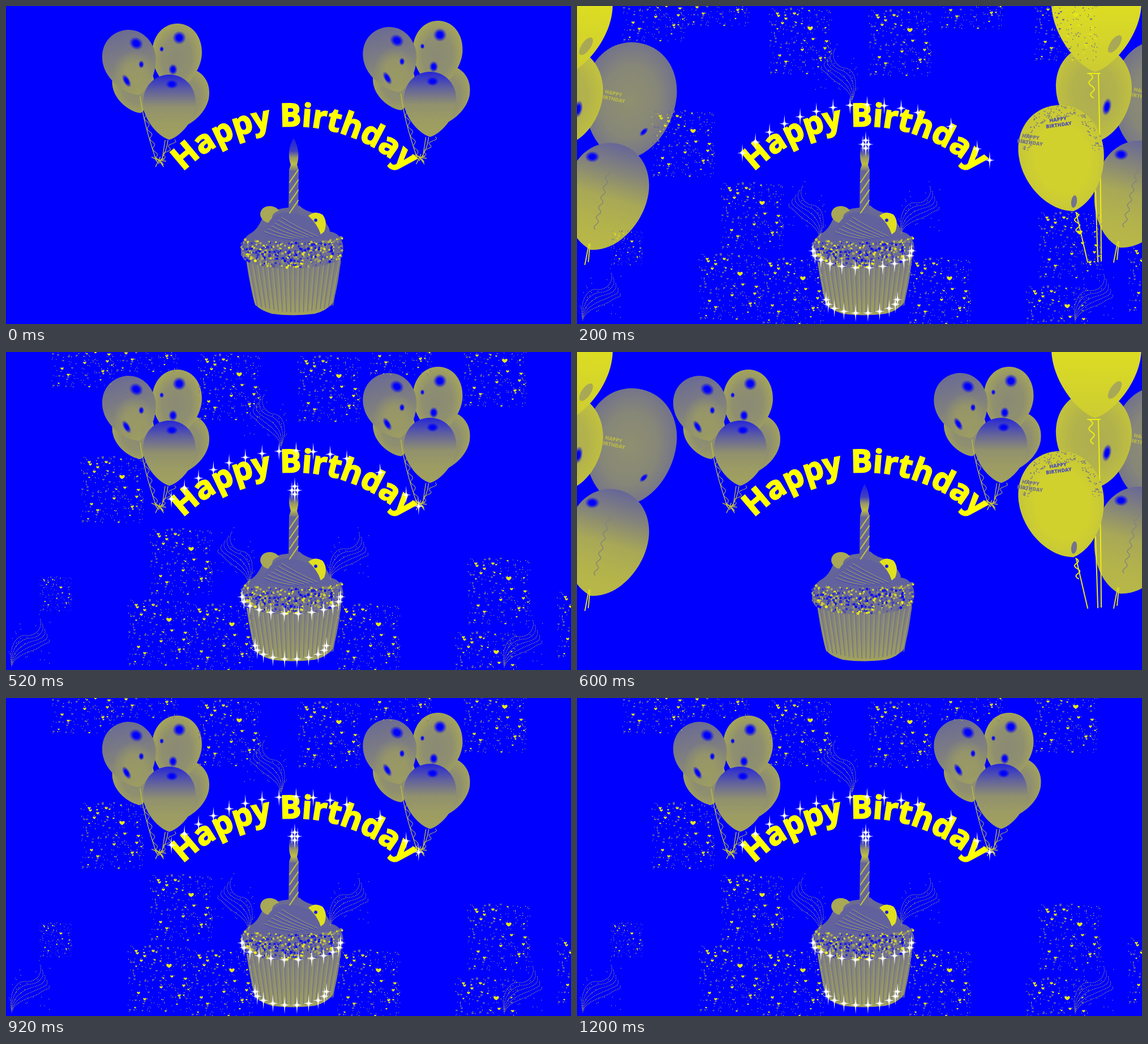
Recreate the animation shown at these times as an HTML page. Size 998 by 561 pixels, loop 1.4 s.

```html
<!DOCTYPE html>
<html lang="en">
<head>
<meta charset="utf-8">
<title>Happy Birthday</title>
<style>
html, body { margin: 0; width: 100%; height: 100%; overflow: hidden; background: #00f; }
svg { display: block; width: 100%; height: 100%; }
.title { font: 700 56px "Open Sans", "Noto Sans", sans-serif; fill: #ff0; stroke: #ff0; stroke-width: 2.2; }
.print { font: 800 9px "Open Sans", sans-serif; text-anchor: middle; }
.line { fill: none; stroke-linecap: round; stroke-linejoin: round; }
</style>
</head>
<body>
<svg viewBox="0 0 998 561" preserveAspectRatio="none">
  <defs id="defs">
    <path id="arc" d="M266.5 352A280 280 0 0 1 751.5 352"/>
    <path id="star" d="M0-16L1.1-1.1 9 0 1.1 1.1 0 16-1.1 1.1-9 0-1.1-1.1Z"/>
  </defs>
  <rect width="998" height="561" fill="#00f"/>
  <g id="small"></g>
  <g id="cake"></g>
  <g id="big"></g>
  <text class="title" text-anchor="middle"><textPath href="#arc" startOffset="50%">Happy Birthday</textPath></text>
  <g id="party"></g>
</svg>
<script>
const $ = id => document.getElementById(id);
const add = (id, markup) => $(id).insertAdjacentHTML('beforeend', markup);
const range = n => Array.from({ length: n }, (_, i) => i);
const fix = v => v.toFixed(1);

// Two-colour scale: 0 is blue, 1 is yellow.
const tone = t => {
  const v = Math.round(255 * t);
  return `rgb(${v},${v},${255 - v})`;
};

const random = seed => () => {
  seed = (seed * 1664525 + 1013904223) >>> 0;
  return seed / 4294967296;
};

// Gradients take evenly spaced tones.
const stops = tones => tones.map((t, i) =>
  `<stop offset="${i / (tones.length - 1)}" stop-color="${tone(t)}"/>`).join('');
const radial = (id, ...tones) => add('defs', `<radialGradient id="${id}" r=".6">${stops(tones)}</radialGradient>`);
const linear = (id, ...tones) => add('defs', `<linearGradient id="${id}" x2="0" y2="1">${stops(tones)}</linearGradient>`);
const fade = (id, t) => add('defs', `<radialGradient id="${id}"><stop offset=".4" stop-color="${tone(t)}"/>
  <stop offset="1" stop-color="${tone(t)}" stop-opacity="0"/></radialGradient>`);

const path = (d, color, w) => w
  ? `<path class="line" d="${d}" stroke="${color}" stroke-width="${w}"/>`
  : `<path d="${d}" fill="${color}"/>`;
const oval = (x, y, rx, ry, fill, turn = 0) =>
  `<ellipse rx="${rx}" ry="${ry}" fill="${fill}" transform="translate(${x} ${y}) rotate(${turn})"/>`;
const spot = (x, y, rx, ry, turn) => oval(x, y, rx, ry, 'url(#spot)', turn);

// "full" sets how round the lower half is.
const balloon = (x, y, rx, ry, turn, fill, full = .4) =>
  `<path transform="translate(${x} ${y}) rotate(${turn}) scale(${rx} ${ry})"
   d="M-1 0C-1-.58-.57-1 0-1S1-.58 1 0C1 .6 ${full} 1.2 0 1.3C${-full} 1.2-1 .6-1 0Z" fill="url(#${fill})"/>`;

// Wavy ribbon between two points.
const ribbon = (x1, y1, x2, y2, wave, turns) => 'M' + range(41).map(i => {
  const u = i / 40;
  return fix(x1 + (x2 - x1) * u + Math.sin(u * turns * 2 * Math.PI) * wave) + ' ' + fix(y1 + (y2 - y1) * u);
}).join('L');

function smallBunch() {
  fade('spot', 0);
  fade('glow', .62);
  linear('left', .42, .5, .62);
  radial('top', .54, .56, .68);
  radial('back', .54, .56, .66);
  linear('front', .15, .38, .57, .61, .63);
  const r = random(8);
  const tails = range(12).map(() => `M270 272l${fix(r() * 28 - 14)} ${fix(r() * 18 - 6)}`).join('');
  add('defs', '<g id="bunch">' +
    path(ribbon(244, 186, 268, 275, 3, 5) + ribbon(298, 236, 270, 278, 4, 3), tone(.58), 1.2) +
    balloon(225, 137, 37, 41, -14, 'back') +
    balloon(318, 155, 41, 45, 8, 'back') +
    balloon(302, 83, 44, 52, 3, 'top') +
    spot(306, 56, 12, 12) + spot(295, 112, 8, 10) + spot(275, 76, 4, 5) +
    balloon(217.5, 93, 47, 51, -16, 'left') +
    `<g opacity=".7">${oval(226, 117, 38, 40, 'url(#glow)')}</g>` +
    spot(230, 66, 13, 11, 30) + spot(213, 132, 6, 13, -30) + spot(239, 103, 5, 7) +
    balloon(288.5, 171, 46.5, 50, 0, 'front') +
    spot(293, 138, 11, 8) +
    path('M237 160Q243 208 266 274M286 237Q284 258 270 277M281 237L276 270', tone(.75), 1.3) +
    path(tails, tone(.75), 1.4) + '</g>');
  add('small', '<use href="#bunch"/><use href="#bunch" x="460.5" y="-5"/>');
}

const print = (x, y, turn, t) =>
  `<g class="print" transform="translate(${x} ${y}) rotate(${turn})" fill="${tone(t)}">
   <text>HAPPY</text><text y="10">BIRTHDAY</text></g>`;

function bigBunch() {
  radial('grey', .56, .53, .42);
  radial('mid', .68, .7, .78);
  linear('low', .4, .52, .66, .7, .72);
  linear('yellow', .92, .86, .8);
  radial('gold', .82, .82, .76);
  const r = random(11);
  const flecks = range(130).map(() => {
    const a = Math.PI * (1 + r()), k = .75 + r() * .23;
    return `M${fix(855 + Math.cos(a) * 74 * k)} ${fix(257 + Math.sin(a) * 82 * k)}l${fix(r() * 5 - 2)} ${fix(r() * 4 - 2)}`;
  }).join('');
  add('defs', '<g id="crowd">' +
    balloon(1029, 151, 81, 91, 9, 'grey', .6) +
    print(998, 153, 12, .72) + spot(1052, 218, 5, 10, 45) +
    balloon(913, 143, 67, 74, -4, 'mid', .5) + spot(936, 178, 8, 16, 12) +
    balloon(988, 321, 72, 84, 16, 'low', .58) + spot(961, 262, 13, 10) +
    path(ribbon(990, 286, 966, 390, 3, 6), tone(.5), 1.3) +
    path('M955 416L948 452M957 416L954 447', tone(.85), 2) +
    balloon(917.5, -6, 79.5, 94, 1, 'yellow') + oval(950, 67, 8, 18, tone(.66), 35) + '</g>');
  add('big', '<use href="#crowd"/><use href="#crowd" x="-934" y="4"/>' +
    path('M921 119Q925 280 926 450M916 326L920 451M902 119H924', tone(.93), 2) +
    path(ribbon(906, 120, 912, 162, 4, 2), tone(.93), 2) +
    balloon(855, 257, 75, 82.5, -12, 'gold', .55) +
    path(flecks, tone(.45), 1.3) +
    print(850, 203, -8, .3) + print(801, 234, 8, .45) + oval(878, 345, 5, 11, tone(.45), 8) +
    path(ribbon(881, 364, 886, 400, 4, 2) + 'M882 366L902 452', tone(.9), 2));
}

function cupcake() {
  linear('frost', .42, .38, .46);
  linear('cup', .46, .52, .56, .64);
  linear('flame', .12, .18, .26, .6, .75, .45);
  const r = random(5);
  let out = path('M423 440L592 440Q587 495 577 524Q566 538 545 543Q508 548 470 543Q444 535 439 524Q430 490 423 440Z', 'url(#cup)');

  // Pleats, narrowing toward the foot.
  const pleats = shift => range(19).map(i => {
    const dip = 12 * Math.sin(i / 18 * Math.PI);
    return `M${fix(426 + i * 9 + shift)} ${fix(450 + dip)}L${fix(441 + i * 7.4 + shift)} ${fix(528 + dip)}`;
  }).join('');
  out += path(pleats(0), tone(.62), 1.2) + path(pleats(3), tone(.46), 1.6);

  out += path('M415 428Q418 408 434 400Q444 394 452 376Q470 358 496 356L518 352Q528 362 548 366Q572 386 572 398Q590 400 595 420Q598 440 586 450Q550 464 505 463Q455 463 424 450Q414 444 415 428Z', 'url(#frost)');
  out += oval(467, 368, 18, 15, tone(.66), 10) + oval(491, 373, 21, 13, tone(.42));
  out += path('M454 400Q470 360 500 364Q545 368 560 408Q520 418 480 413Q462 410 454 400Z', tone(.38));
  const swirl = shift => range(6).map(i =>
    `M${457 + i * 6} ${398 - i * 5 + shift}Q${480 + i * 6} ${408 - i * 4 + shift} ${510 + i * 8} ${411 - i + shift}`).join('');
  out += path(swirl(0), tone(.52), 1.5) + path(swirl(2), tone(.28), 1.2);
  out += path('M534 370Q546 360 559 368Q569 380 562 398L556 403Q550 384 534 370Z', tone(.88)) + spot(547, 378, 4, 4);

  for (const i of range(480)) {
    const u = r() * 2 - 1, bow = Math.sqrt(1 - u * u);
    const y = 406 + 10 * bow + (32 + 14 * bow) * r();
    out += `<circle cx="${fix(505 + u * 89)}" cy="${fix(y)}" r="${fix(1.4 + r() * 1.2)}" fill="${tone(r() * .95)}"/>`;
  }

  out += path('M500 289H517L516 362Q508 370 499 362Z', tone(.4));
  out += path(range(4).map(i => `M501 ${311 + i * 18}L516 ${289 + i * 18}`).join(''), tone(.75), 2.2);
  out += path('M508 233C516 246 519 264 514 280L517 289Q508 292 500 289L503 280C497 264 500 246 508 233Z', 'url(#flame)');
  add('cake', out);
}

const heart = (x, y, s) =>
  `M${x} ${y + s}c${-2 * s} ${-s} ${-s} ${-2.4 * s} 0 ${-1.4 * s}c${s} ${-s} ${2 * s} ${.4 * s} 0 ${1.4 * s}z`;

function confetti() {
  const r = random(29);
  const place = () => [-74 + r() * 114, -35 + r() * 117].map(Math.round);
  const dots = (n, size) => range(n).map(() => `M${place().join(' ')}h${size}v${size}h${-size}z`).join('');
  const hearts = (n, size) => range(n).map(() => heart(...place(), size)).join('');
  add('defs', '<g id="patch">' +
    path(dots(140, 1.4) + hearts(24, 1.8), tone(.42)) +
    path(dots(60, 1.2) + hearts(14, 1.5) + hearts(12, 2.4) + heart(0, 0, 4.2), tone(.9)) + '</g>');

  const spots = [[412, 39], [588, 42], [205, 220], [327, 347], [288, 472], [399, 480], [658, 480],
    [888, 399], [866, 529], [881, 15], [153, -19], [266, -46], [714, -41], [1046, 458]];
  add('party', spots.map(([x, y]) => `<use href="#patch" x="${x}" y="${y}"/>`).join('') +
    '<use href="#patch" transform="translate(97 415) scale(.52)"/>');
}

function swirls() {
  const r = random(3);
  const curves = range(5).map(i =>
    `M0 0C${i * 3 - 6} ${i * 3 - 34} ${8 + i * 7} ${i * 8 - 56} ${26 + i * 6} ${i * 5 - 54}S${56 + i * 3} ${i * 8 - 70} ${50 + i * 4} ${i * 9 - 84}`).join('');
  const loose = range(28).map(() => `M${fix(r() * 84 - 8)} ${fix(r() * 88 - 92)}h1.2v1.2h-1.2z`).join('');
  add('defs', `<g id="swirl"><path class="line" d="${curves}" stroke="${tone(.8)}" stroke-width="1.2"
    stroke-dasharray=".1 2.8"/>${path(loose, tone(.65))}</g>`);
  const spots = [[485, 168, -1], [428, 410, -1], [573, 401, 1], [10, 554, 1], [880, 556, 1]];
  add('party', spots.map(([x, y, side]) =>
    `<use href="#swirl" transform="translate(${x} ${y}) rotate(${side < 0 ? 14 : 0}) scale(${side} 1)"/>`).join(''));
}

// Stars spread along an elliptic arc, angles in degrees.
const starArc = (x, y, rx, ry, from, to, n) => range(n).map(i => {
  const a = (from + (to - from) * i / (n - 1)) * Math.PI / 180;
  return `<g fill="#fff" transform="translate(${fix(x + rx * Math.cos(a))} ${fix(y + ry * Math.sin(a))})">
    <circle r="3.6" opacity=".4"/><use href="#star"/><circle r="2.2"/></g>`;
}).join('');

function sparkles() {
  add('party',
    starArc(509, 492, 318, 318, -133, -73, 12) +
    starArc(509, 492, 318, 318, -61.5, -61.5, 2) +
    starArc(509, 492, 311, 311, -50.5, -45, 2) +
    starArc(510, 244, 5, 7, -90, 180, 4) +
    starArc(504, 432, 87, 30, 180, 0, 12) +
    starArc(503, 518, 63, 24, 180, 0, 10));
}

smallBunch();
bigBunch();
cupcake();
confetti();
swirls();
sparkles();

// Which layers are on in each of the seven equal steps.
const shown = {
  small: i => i !== 1,
  big: i => i % 2 === 1,
  party: i => i === 1 || (i > 0 && i % 2 === 0)
};
for (const [id, on] of Object.entries(shown)) {
  const frames = range(8).map(i => ({ opacity: +on(Math.min(i, 6)), offset: i / 7, easing: 'step-end' }));
  $(id).animate(frames, { duration: 1400, iterations: Infinity });
}
</script>
</body>
</html>
```
